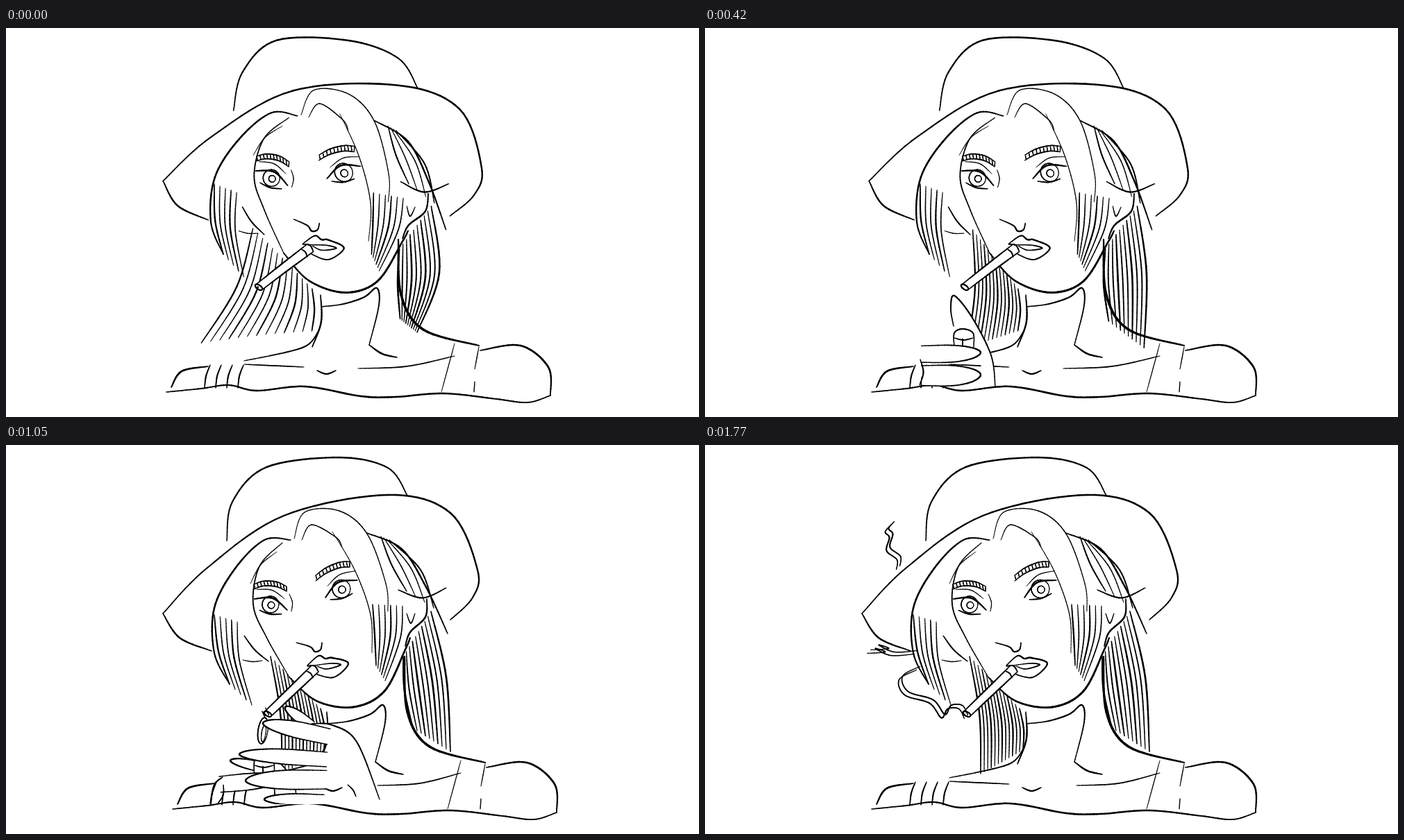
Write an HTML page with a canvas that moves like this. It is 998 px wide and 561 px high and loops after 1860 ms.

```html
<!DOCTYPE html>
<html lang="en">
<head>
<meta charset="utf-8">
<title>Ink portrait</title>
<style>
html, body { margin: 0; width: 100%; height: 100%; overflow: hidden; background: #fff; }
canvas { display: block; }
</style>
</head>
<body>
<canvas id="stage" width="998" height="561"></canvas>
<script>
const ctx = document.getElementById('stage').getContext('2d');
const LOOP = 1860, FIRST = 150, STEP = 90;
ctx.lineCap = ctx.lineJoin = 'round';

const mix = (a, b, t) => a + (b - a) * t;
const mixPoint = (p, q, t) => [mix(p[0], q[0], t), mix(p[1], q[1], t)];
const points = s => s.split(' ').map(p => p.split(',').map(Number));
const shift = (dx, dy = 0) => ([x, y]) => [x + dx, y + dy];
const still = shift(0);
let place = still; // moves every drawn point into the current pose

// Value of a track of [step, value] keys, linear between keys
function track(step, ...keys) {
  const next = keys.findIndex(k => k[0] > step);
  if (next < 0) return keys[keys.length - 1][1];
  if (next === 0) return keys[0][1];
  const [s0, v0] = keys[next - 1], [s1, v1] = keys[next];
  return mix(v0, v1, (step - s0) / (s1 - s0));
}

// Catmull-Rom curve through the points
function smooth(pts) {
  const at = i => pts[Math.max(0, Math.min(pts.length - 1, i))];
  const spline = (a, b, c, d, t) =>
    b + t / 2 * (c - a + t * (2 * a - 5 * b + 4 * c - d + t * (3 * (b - c) + d - a)));
  const out = [];
  for (let i = 0; i < pts.length - 1; i++) {
    const near = [at(i - 1), at(i), at(i + 1), at(i + 2)];
    for (let k = 0; k < 10; k++) {
      out.push([0, 1].map(axis => spline(...near.map(p => p[axis]), k / 10)));
    }
  }
  out.push(at(pts.length));
  return out;
}

// Pen stroke that thins out at both ends; can be partly drawn or filled white
function ink(width, shape, { part = 1, fill = false } = {}) {
  const line = smooth((typeof shape === 'string' ? points(shape) : shape).map(p => place(p)));
  const n = line.length - 1;
  if (fill) {
    ctx.fillStyle = '#fff';
    ctx.beginPath();
    line.forEach(p => ctx.lineTo(...p));
    ctx.fill();
  }
  for (let i = 0; i < n * part; i++) {
    ctx.lineWidth = width * (0.6 + 0.4 * Math.sin(Math.PI * (i + 0.5) / n));
    ctx.beginPath();
    ctx.moveTo(...line[i]);
    ctx.lineTo(...line[i + 1]);
    ctx.stroke();
  }
}

// Simple bow; a positive bend is to the right of the direction of travel
function arc(width, x0, y0, x1, y1, bend = 0) {
  const len = Math.hypot(x1 - x0, y1 - y0);
  ink(width, [[x0, y0], [(x0 + x1) / 2 - (y1 - y0) / len * bend, (y0 + y1) / 2 + (x1 - x0) / len * bend], [x1, y1]]);
}

function ring(width, x, y, rx, ry = rx, tilt = 0) {
  ink(width, Array.from({ length: 13 }, (_, i) => {
    const a = i * Math.PI / 6, u = rx * Math.cos(a), v = ry * Math.sin(a);
    return [x + u * Math.cos(tilt) - v * Math.sin(tilt), y + u * Math.sin(tilt) + v * Math.cos(tilt)];
  }));
}

// Strands of hair spread between two guide curves
function strands(count, width, from, to) {
  const [a, b] = [points(from), points(to)];
  for (let i = 0; i < count; i++) {
    const t = i / (count - 1);
    ink(width * (i % 3 ? 0.85 : 1.15), a.map((p, k) => mixPoint(p, b[k], t)));
  }
}

// Tapered finger, open at its base
function finger(tipX, tipY, baseX, baseY, thick) {
  const dx = tipX - baseX, dy = tipY - baseY, len = Math.hypot(dx, dy);
  const at = (along, side) => [
    baseX + dx * along - dy / len * thick * side,
    baseY + dy * along + dx / len * thick * side];
  ink(2.2, [at(0, 0.45), at(0.5, 0.5), at(0.85, 0.33), at(1, 0), at(0.85, -0.3), at(0.5, -0.48), at(0, -0.5)], { fill: true });
}

function lighter(x, y, height) {
  ink(2, [[x, y + height], [x, y], [x + 12, y - 6], [x + 27, y], [x + 28, y + height]], { fill: true });
  arc(1.8, x, y + 7, x + 27, y + 7, 3);
  arc(1.8, x + 12, y + 8, x + 12, y + height);
}

// Position of a point of the tilted head when the head is upright
const upright = ([x, y]) => [x + Math.min(15, 0.09 * (245 - y)), y + 24 * Math.tanh((x - 478) / 150)];

function drawBackHair(step) {
  const left = track(step, [0, 302], [2, 365], [4, 388], [6, 397]);
  const top = track(step, [0, 361], [2, 372], [4, 381]);
  strands(13, 2, `${top},305 ${mix(left, top, 0.6) + 8},390 ${left},474`, '453,380 459,410 458,440');
  const hang = track(step, [0, 0], [2, 1]);
  const low = [mix(582, 586, hang), mix(405, 408, hang)], tip = [mix(608, 640, hang), mix(422, 442, hang)];
  strands(10, 2.3, `572,305 574,355 ${low}`, `612,240 ${mix(632, 634, hang)},335 ${tip}`);
}

function drawBody(step) {
  place = shift(track(step, [0, -9], [2, 0]));
  // neck and choker
  arc(2.4, 462, 385, 450, 460, -7);
  ink(2, '352,480 415,467 445,456 460,435');
  ink(2.2, '463,402 495,398 525,388 543,375 546,400 532,457');
  arc(2.4, 532, 457, 572, 475, 4);
  ink(3.6, '574,305 578,385 610,435 690,458');
  // shoulders and lower edge
  ink(2.8, '692,465 750,458 790,489 793,530');
  ink(2.6, '793,530 760,540 715,535 640,527 570,532 520,531 440,517 370,523 330,515 290,520 240,525');
  ink(2.7, '247,518 262,495 300,488');
  // collarbones
  arc(1.8, step < 11 ? 516 : 535, 491, 655, 473, 6);
  arc(1.8, 352, 485, 438, 489);
  arc(2.2, 457, 494, 484, 494, 5);
  // straps
  arc(1.3, 655, 455, 636, 525);
  arc(1.3, 690, 460, 684, 492);
  arc(1.3, 684, 510, 683, 525);
  for (const x of [303, 319, 335, 351]) arc(2, x, 486, x - 8, 519, 2);
  place = still;
}

function drawBrow(x0, y0, x1, y1, lift, thick) {
  const at = (t, down) => [mix(x0, x1, t), mix(y0, y1, t) - lift * Math.sin(Math.PI * t) + down];
  const edge = down => [0, 0.3, 0.7, 1].map(t => at(t, down));
  ink(1.8, edge(0));
  ink(1.8, edge(thick));
  for (let t = 0; t <= 1; t += 0.1) ink(1.4, [at(t, 0), at(Math.min(1, t + 0.04), thick)]);
}

function drawEye(x0, y0, x1, y1, r, closed) {
  const x = (x0 + x1) / 2, y = (y0 + y1) / 2, slope = (y1 - y0) / (x1 - x0);
  arc(1.3, x - 20, y - 15 - 20 * slope, x + 20, y - 15 + 20 * slope, -6);
  if (closed) {
    arc(3.2, x0, y0 + 8, x1 + 4, y1 + 7, 6);
    return;
  }
  arc(2.6, x0, y0, x1, y1, -r * 0.8);
  ring(1.5, x, y, r);
  ring(1.3, x + 1, y + 1, r * 0.4);
  arc(2, x - 16, y + 11 - 8 * slope, x + 16, y + 11 + 8 * slope, 3);
}

function drawHead(step) {
  const tilt = track(step, [0, 0], [4, 0], [6, 0.6], [11, 1]);
  const move = shift(track(step, [0, 0], [2, 12], [4, 10], [6, 6], [11, 0]));
  place = p => move(mixPoint(upright(p), p, tilt));
  drawBackHair(step);

  // hat
  ink(2.5, '318,138 326,82 375,32 480,18 550,33 578,73');
  ink(2.6, '226,243 290,177 400,102 550,72 640,98 679,180 672,220 640,252');
  ink(2.4, '226,243 250,278 296,297');

  // hair around the face
  ink(2.6, '410,137 372,137 330,178 300,235 300,300 322,345');
  ink(1.8, '398,141 365,175 356,230 375,277 408,335');
  arc(1.2, 390, 154, 352, 200, 6);
  strands(5, 2, '300,245 306,298 322,345', '333,255 336,310 354,375');
  arc(2, 343, 275, 378, 312, 3);
  arc(1.3, 341, 310, 369, 311, 2);
  ink(1.5, '415,135 430,97 480,95 520,128 547,200 550,240');
  ink(1.5, '426,137 440,115 475,133 484,147');
  ink(1.3, '470,125 503,182 525,245 527,300');
  ink(2.5, '520,127 570,150 605,205 636,272');
  strands(4, 1.8, '540,132 555,172 577,211', '552,137 597,180 616,235');
  arc(2.2, 565, 209, 634, 206, 13);
  strands(6, 2, '528,230 531,275 533,318', '571,232 568,278 546,340');
  arc(1.6, 577, 243, 589, 243, 14);
  ink(2.5, '606,222 604,248 582,270 575,290');

  // jaw, nose and lips
  ink(3, '408,335 447,369 500,378 545,355 575,295 582,278');
  ink(2.1, '418,285 438,291 445,298 453,295 455,285');
  ink(2.3, '434,318 450,304 460,308 470,307 493,315 472,335 445,330');
  ink(1.8, '438,319 467,315 482,317 462,323 448,319');

  // eyes
  const closed = step >= 6 && step <= 8;
  drawBrow(357, 201, 404, 204, 7, 7);
  drawBrow(446, 188, 495, 168, 6, 8);
  drawEye(357, 222, 405, 238, 12, closed);
  drawEye(460, 220, 506, 195, 13, closed);
  arc(1.2, 408, 215, 411, 240, -3);

  // cigarette
  ctx.fillStyle = '#fff';
  ctx.beginPath();
  for (const p of points('440,318 450,327 382,391 372,384')) ctx.lineTo(...place(p));
  ctx.fill();
  arc(2.2, 440, 318, 372, 385);
  arc(2.2, 450, 327, 382, 391);
  arc(2, 434, 319, 450, 327, -5);
  arc(1.8, 433, 326, 442, 336, -2);
  ring(2, 377, 388, 6, 3, 0.5);
  place = still;
}

function drawLighterHand(step) {
  if (step < 2 || step > 18) return;
  place = shift(0, track(step, [2, 0], [3, 28], [4, 0], [15, 0], [19, 70]) * (step !== 2));
  if (step === 2) {
    finger(408, 422, 400, 500, 28);
    lighter(391, 463, 30);
    finger(330, 503, 375, 498, 32);
    finger(432, 512, 342, 488, 27);
  } else if (step <= 5) {
    ink(2.2, '358,430 354,405 359,386 385,418 412,472 418,517', { fill: true });
    lighter(359, 440, 20);
    finger(397, 500, 312, 502, 30);
    finger(397, 468, 312, 471, 25);
    arc(2, 310, 478, 309, 515, -5);
  } else {
    ink(1.8, '356,460 374,441 413,482 417,518', { fill: true });
    finger(323, 455, 380, 467, 14);
    lighter(358, 455, 28);
    arc(1.6, 386, 490, 388, 515);
    finger(398, 480, 308, 490, 24);
    ink(2.2, '294,517 300,490 312,479');
    arc(1.8, 313, 490, 305, 517, -4);
  }
  place = still;
}

function drawShieldingHand(step) {
  if (step < 9 || step > 14) return;
  place = shift(
    track(step, [9, 50], [11, 0], [12, 0], [14, 150]),
    track(step, [9, 75], [11, 0], [12, 0], [14, 70]));
  finger(402, 378, 440, 405, 16);
  ink(2.2, '440,402 470,404 505,428 538,511', { fill: true });
  finger(372, 511, 458, 512, 17);
  finger(345, 484, 462, 482, 28);
  finger(336, 446, 462, 453, 22);
  finger(370, 401, 465, 420, 24);
  arc(1.7, 492, 490, 504, 507, -2);
  place = still;
}

function drawFire(step) {
  if (step === 6) {
    ring(1.8, 358, 422, 4, 14, -0.45);
    ring(1.8, 349, 435, 3, 9, -0.8);
    ring(1.6, 376, 430, 2.5, 5, -0.2);
  }
  if (step >= 8 && step <= 12) {
    ring(1.7, 370, 412, 7, 19, 0.15);
    ring(1.2, 371, 416, 3, 12, 0.15);
  }
}

function drawSmoke(step) {
  const part = track(step, [10, 0], [12, 0.2], [15, 1]);
  const drift = track(step, [15, 0], [17, 1]);
  const wisp = track(step, [16, 0], [19, 1]);
  for (const side of [-1, 1]) {
    place = shift(2.5 * side, -2.5 * side);
    if (part) ink(2, '376,392 368,378 352,378 343,391 326,370 290,358 282,336 307,322', { part });
    if (drift) ink(1.8, '304,299 270,301 248,291 262,296 236,298', { part: drift });
    if (wisp) ink(2, '278,177 279,163 264,150 268,131 262,123 270,113', { part: wisp });
  }
  place = still;
}

function draw(step) {
  ctx.clearRect(0, 0, 998, 561);
  drawBody(step);
  drawHead(step);
  ctx.save();
  ctx.beginPath();
  ctx.rect(0, 0, 998, 518);
  ctx.clip();
  drawLighterHand(step);
  drawFire(step);
  drawShieldingHand(step);
  ctx.restore();
  drawSmoke(step);
}

let shown = -1;
function tick() {
  const ms = performance.now() % LOOP;
  const step = ms < FIRST ? 0 : 1 + Math.floor((ms - FIRST) / STEP);
  if (step !== shown) draw(shown = step);
  requestAnimationFrame(tick);
}
tick();
</script>
</body>
</html>
```
